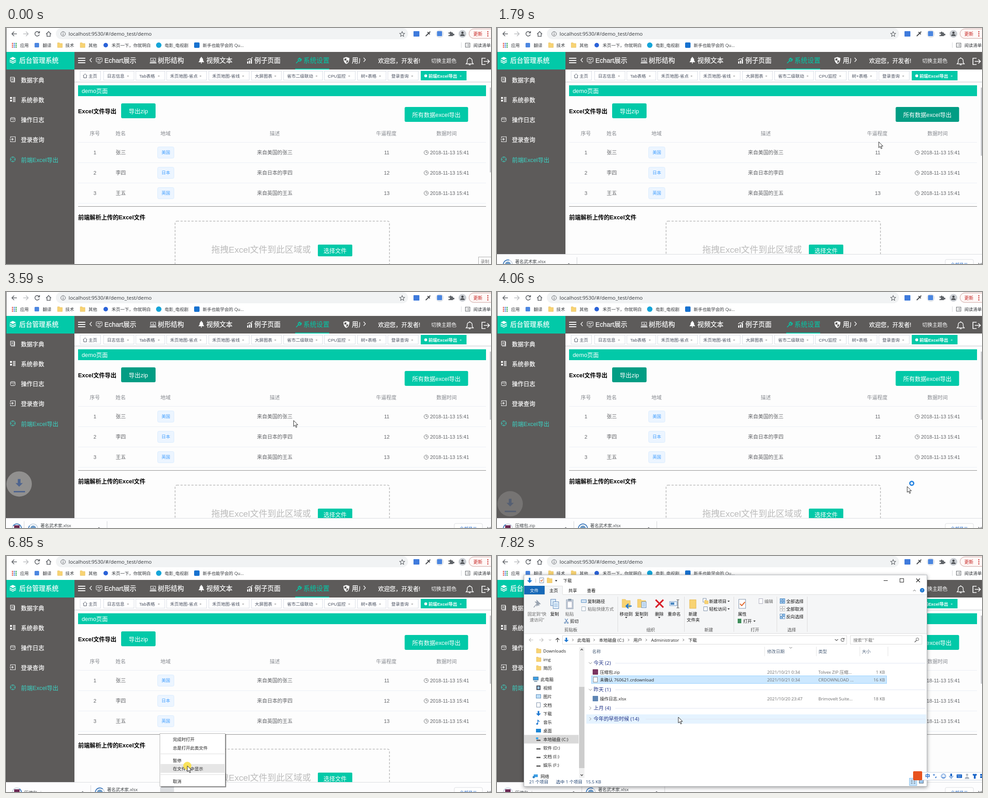
Recreate the animation shown at these times as an HTML page. Size 1070 by 523 pixels, loop 8000 ms.

```html
<!DOCTYPE html>
<html lang="zh-CN">
<head>
<meta charset="utf-8">
<title>demo</title>
<style>
html, body { margin: 0; width: 100%; height: 100%; overflow: hidden; background: #fff; }
svg { display: block; }
text { font-family: "Liberation Sans", "Noto Sans CJK SC", "Noto Sans CJK", sans-serif; white-space: pre; }
.ui text { font-family: "Open Sans", "Noto Sans CJK SC", "Noto Sans CJK", sans-serif; }
#win { filter: drop-shadow(0 2px 4px #0006); }
</style>
</head>
<body>
<svg id="stage" width="1070" height="523" viewBox="0 0 1070 523"></svg>
<script>
const TEAL = '#02c9a8', DARK = '#029d84', GREY = '#5d5b5a', BLUE = '#1f78d1', FOLDER = '#f8d373';

// Drawing helpers: each returns SVG markup; text is placed by its vertical centre.
const T = (x, y, s, str, fill = '#222', more = '') =>
  `<text x="${x}" y="${(y + s * .37).toFixed(2)}" font-size="${s}" fill="${fill}" ${more}>${str}</text>`;
const MID = 'text-anchor="middle"', END = 'text-anchor="end"', BOLD = 'font-weight="700"';
const FIRM = 'font-weight="500" stroke="#fff" stroke-width=".25"';
const R = (x, y, w, h, fill, more = '') => `<rect x="${x}" y="${y}" width="${w}" height="${h}" fill="${fill}" ${more}/>`;
const C = (x, y, r, fill, more = '') => `<circle cx="${x}" cy="${y}" r="${r}" fill="${fill}" ${more}/>`;
const P = (d, stroke = '#444', w = 1.2, fill = 'none', more = '') =>
  `<path d="${d}" stroke="${stroke}" stroke-width="${w}" fill="${fill}" ${more}/>`;
const G = (id, body, more = '') => `<g id="${id}" ${more}>${body}</g>`;
const each = (list, f) => list.map(f).join('');
const line = c => `stroke="${c}"`;
const folder = (x, y, k = 1) =>
  P(`M${x - 5 * k} ${y - 5 * k}h${4 * k}l${k} ${1.5 * k}h${5 * k}v${8.5 * k}h${-10 * k}z`, '#e3b64c', .6, FOLDER);
const page = (x, y, w, h, c = '#7a8ea8', fill = '#fff') => R(x - w / 2, y - h / 2, w, h, fill, line(c));
const down = (x, y, k, c) => P(`M${x - 2 * k} ${y - 6 * k}h${4 * k}v${6 * k}h${4 * k}l${-6 * k} ${6 * k}l${-6 * k} ${-6 * k}h${4 * k}z`, 'none', 0, c);

function browser() {
  const S = '#5f6368', u = 9.6;
  return R(0, 0, 1070, 53, '#fff')
    + P('M24 13H13M18 8l-5 5 5 5', S, 1.6) + P('M38 13h11M44 8l5 5-5 5', '#bbbdc0', 1.6)
    + P('M73 10a5 5 0 1 0 .6 4.5M74 7v4h-4', S, 1.6) + P('M88.5 13.5l5.5-5.5 5.5 5.5M90.5 12v6.5h7V12', S, 1.6)
    + R(110, 0, 777, 25, '#f1f3f4', 'rx="12.5"')
    + C(126, 13, 5, 'none', line(S)) + P('M126 12v4M126 9.5v1.3', S, 1.2)
    + T(138, 13, 11.4, 'localhost:9530/#/demo_test/demo', '#33363a')
    + P('M874 8l1.5 3.5 4 .4-3 2.6.9 4-3.4-2.1-3.4 2.1.9-4-3-2.6 4-.4z', S, 1.1)
    + R(899, 7, 13, 12, '#3f7bdc', 'rx="1"') + P('M926 18l6-6M930 9l5 5M933 11l3-3', '#4a4d51', 2.2)
    + C(957, 13, 9, '#e6e9ed') + R(951, 7, 11, 11, '#4b86e0', 'rx="1.5"')
    + P('M976 10h3a2 2 0 1 1 4 0h3v3a2 2 0 1 1 0 3v2h-10v-2.5a2 2 0 1 0 0-3z', S, 0, S)
    + C(1007, 13, 8.5, '#c9cdd2') + C(1007, 10.5, 2.5, '#4a4d51') + P('M1002 17.5a5 3.8 0 0 1 10 0z', S, 0, '#4a4d51')
    + R(1021.5, 2, 60, 21, '#fff8f7', 'rx="10.5" stroke="#c99a96"') + T(1031, 13, 10, '更新', '#c5221f')
    + each([8.5, 13, 17.5], y => C(1063, y, 1.3, '#c5221f'))
    + each([0, 1, 2, 3, 4, 5, 6, 7, 8], i => R(13 + i % 3 * 4, 33 + (i / 3 | 0) * 4, 2.6, 2.6, ['#e2574c', '#4b86e0', '#3aa757'][i % 3]))
    + R(63, 33, 10, 10, '#4b86e0', 'rx="1.5"') + folder(119, 38, 1.05) + folder(169, 38, 1.05)
    + C(220, 38, 5, '#2a62d8') + C(337, 38, 6, '#15a5d8') + R(415, 32, 12, 12, '#1772d0', 'rx="2"')
    + each([[31, '应用'], [81, '翻译'], [131, '技术'], [182, '其他'], [233, '禾页一下，你就明白'], [350, '电影_电视剧'],
      [434, '新手也能学会的 Qu...'], [1031, '阅读清单']], ([x, s]) => T(x, 38, u, s, '#33363a'))
    + P('M1004.5 32v12', '#d5d7da', 1) + R(1013.5, 33.5, 10, 9, 'none', line(S)) + P('M1015.5 36.5h1M1018 36.5h4M1015.5 39.5h1M1018 39.5h4', S, 1);
}

function side() {
  const items = ['数据字典', '系统参数', '操作日志', '登录查询', '前端Excel导出'], W = '#fff', A = '#3bd3c4';
  return R(0, 53, 151, 470, GREY) + R(0, 53, 151, 39, TEAL)
    + P('M15 64l7 3.5-7 3.5-7-3.5z', W, 0, W) + P('M8 71l7 3.5 7-3.5M8 74.5l7 3.5 7-3.5', W, 1.6)
    + T(29, 72, 14.5, '后台管理系统', W, FIRM)
    + each(items, (s, i) => T(33, 115 + i * 44.2, 12.8, s, i == 4 ? A : W, i == 4 ? '' : FIRM))
    + P('M10 109h8v9h-8zM12 112h4M12 114.5h4M19 110v10h-8', W, 1.2)
    + R(9, 153, 4, 4, W) + R(9, 159, 4, 4, W) + P('M15 154h6M15 157h6M15 160h6M15 163h6', W, 1.4)
    + R(10, 198.5, 10, 9, 'none', 'rx="2" ' + line(W)) + P('M10 201.5h10M15 205h2', W, 1)
    + P('M10 244v-3h10.5v11H10v-3M8 246.5h8M13.5 244l2.5 2.5-2.5 2.5', W, 1.1)
    + C(15, 291, 5.5, 'none', line(A)) + P('M15 285v4M15 293v4M9 291h4M17 291h4', A, 1);
}

function header() {
  const W = '#fff', tabs = [[216, 67, '日志信息'], [287, 64, 'Tab表格'], [355, 88, '禾页地图-省点'], [448, 89, '禾页地图-省线'],
    [542, 66, '大屏图表'], [613, 86, '省市二级联动'], [703, 68, 'CPU监控'], [776, 63, '树+表格'], [843, 67, '登录查询']];
  return R(151, 53, 919, 39, GREY)
    + P('M159 67h16M159 72h16M159 77h16', W, 2) + P('M189 66.5l-4 4.5 4 4.5', W, 1.3)
    + R(199, 66, 13, 9, 'none', 'rx="1" ' + line(W)) + P('M201.5 71l2.5-2 2 2.5 3.5-3M202 78h7', W, 1.2)
    + R(319, 67, 11, 10, 'none', line(W)) + P('M322 76v-5M325 76v-7M327.5 76v-4M317 77.5h15', W, 1.3)
    + P('M431 65l3 4v3l2 3h-10l2-3v-3zM431 75v4', W, 1.4, W)
    + R(532, 74, 2.5, 5, W) + R(536, 72, 2.5, 7, W) + R(540, 69, 2.5, 10, W) + P('M532 71l4-3 3 1 5-4', W, 1.3)
    + P('M640 78l6-6M645 72a3.5 3.5 0 0 1 4-5l-1 2.5 2 1 1.5-1.5a3.5 3.5 0 0 1-5 4z', TEAL, 1.7)
    + P('M751 65l6 2c0 6-2 10-6 12-4-2-6-6-6-12z', W, 1.2, W) + P('M751 67v5h-4.5v-4zM751 72h4.5q-1 4-4.5 6z', W, 0, GREY)
    + each([[217, 'Echart展示'], [335, '树形结构'], [442, '视频文本'], [548, '例子页面'], [656, '系统设置'], [763, '用户']],
      ([x, s], i) => T(x, 72, 14.4, s, i == 4 ? TEAL : W, i == 4 ? '' : FIRM))
    + R(638, 90, 75, 2, TEAL) + R(781, 60, 18, 28, GREY) + P('M789 66l4 4.5-4 4.5', W, 1.3)
    + T(821, 72, 12.8, '欢迎您，开发者!', W, FIRM) + T(938, 73, 11.2, '切换主题色', W)
    + P('M1015 79.5h16l-2.5-3v-4a5.5 5.5 0 0 0-11 0v4zM1021 81.5h4M1023 65v2', W, 1.4)
    + P('M1058 67h-8v14h8M1054 74h12M1062 69.5l4.5 4.5-4.5 4.5', W, 1.7)
    + R(151, 92, 919, 28, '#fff') + R(151, 118.5, 919, 2.5, '#e4e5e8')
    + R(163.5, 95.5, 45, 20, '#fff', line('#d8dce5')) + P('M170 106l4.5-4.5 4.5 4.5M171.5 105.5v5h6v-5', '#495060', 1) + T(182, 106, 9.6, '主页', '#495060')
    + each(tabs, ([x, w, s]) => R(x - .5, 95.5, w, 20, '#fff', line('#d8dce5')) + T(x + 7, 106, 9.6, s, '#495060') + T(x + w - 14, 106.5, 8, '×', '#777', MID))
    + R(915, 95, 101, 21, TEAL) + C(926, 106, 3.2, '#fff') + T(932, 106, 9.6, '前端Excel导出', '#fff', BOLD) + T(1003, 106.5, 8, '×', '#fff', MID);
}

function content() {
  const heads = [[196, '序号'], [253, '姓名'], [352, '地域'], [593, '描述'], [839, '牛逼程度'], [972, '数据时间']];
  const rows = [['张三', '美国'], ['李四', '日本'], ['王五', '英国']], ink = '#606266';
  return R(151, 120, 919, 403, '#fdfdfd') + R(159, 127, 900, 24, TEAL) + T(167, 139, 12.8, 'demo页面', '#fff')
    + T(159, 184, 12.8, 'Excel文件导出', '#000', BOLD)
    + R(254, 167, 76, 33, TEAL, 'rx="3" id="zipBtn"') + T(292, 184, 13, '导出zip', '#fff', MID)
    + R(879.5, 175, 140, 33, TEAL, 'rx="3" id="allBtn"') + T(949.5, 192, 12.8, '所有数据excel导出', '#fff', MID)
    + each(heads, ([x, s]) => T(x, 234, 11.2, s, '#85888e', MID + ' font-weight="500"'))
    + each([253, 298, 343, 388], y => R(159, y, 900, 1, '#ebeef5'))
    + each(rows, ([name, land], i) => {
      const y = 276 + i * 45;
      return T(196, y, 11.2, i + 1, ink, MID) + T(242, y, 11.2, name, ink)
        + R(334.5, y - 12.5, 36, 25, '#ecf5ff', 'rx="3" ' + line('#d9ecff')) + T(352.5, y - .5, 9.6, land, '#409eff', MID)
        + T(593, y, 11.2, `来自${land}的${name}`, ink, MID) + T(840, y, 11.2, 11 + i, ink, MID)
        + C(927, y, 4.6, 'none', line(ink) + ' stroke-width=".9"') + P(`M927 ${y - 3}v3h3`, ink, .9)
        + T(935.5, y, 11, '2018-11-13 15:41', ink);
    })
    + R(159, 395, 900, 1, '#8b8b8b') + T(159, 419, 12.8, '前端解析上传的Excel文件', '#000', BOLD)
    + R(373, 428, 473, 160, 'none', 'rx="4" stroke="#bbb" stroke-width="1.6" stroke-dasharray="4.8 3.2"')
    + T(453, 491, 19.2, '拖拽Excel文件到此区域或', '#bbb')
    + R(688, 480, 76, 26, TEAL, 'rx="2"') + T(726, 493, 12.8, '选择文件', '#fff', MID)
    + R(1067.5, 132, 2.5, 188, '#c4c6ca', 'id="bar"');
}

const item = (id, name, icon) => G(id,
  `<clipPath id="${id}Clip"><rect id="${id}Box" y="500" height="30"/></clipPath><g clip-path="url(#${id}Clip)">`
  + icon + C(20, 524, 10, 'none', 'stroke="#c3d0de" stroke-width="1.6"')
  + C(20, 524, 10, 'none', `stroke="#3b78bd" stroke-width="1.8" stroke-dasharray="38 25" id="${id}Ring"`)
  + `<g id="${id}Text">${T(36, 517, 9.6, name, '#3c4043')}</g></g>`
  + G(id + 'Edge', P('M0 508v20', '#d0d2d5', 1) + P('M-20.5 524l2.5-2 2.5 2', '#5f6368', 1.2)));

const shelf = () => G('shelf', R(0, 0, 1070, 60, '#fdfdfe', 'id="shelfBg"')
  + G('shelfLine', R(0, 0, 1070, 1, '#dadce0'))
  + item('zip', '压缩包.zip', R(14, 517, 12, 12, '#6d2a55')) + item('xls', '著名武术家.xlsx', C(20, 524, 6.5, '#6f9cc8'))
  + G('all', R(989, 0, 62, 24, '#fff', 'rx="3" ' + line('#dadce0')) + T(1020, 11.5, 9.6, '全部显示', '#1a63c8', MID)
    + P('M1062 8l7 7m0-7l-7 7', '#5f6368', 1.3)));

const badge = () => G('badge', C(29, 28, 28, '#c8c8c6') + P('M26 17h6v9h5l-8 8-8-8h5zM17 43.5h25v3h-25z', 'none', 0, '#3f6fc4'));

const menu = () => G('menu', R(340, 511, 30, 12, '#dcdee1') + R(342, 395, 143.5, 117.5, '#0008') + R(339.5, 393.5, 144, 117, '#fff', line('#b5b5b5'))
  + R(341, 461, 141, 19.5, '#e6e6e6', 'id="pick"') + R(341, 438, 141, 1, '#ddd') + R(341, 484, 141, 1, '#ddd')
  + each([[406, '完成时打开'], [425, '总是打开此类文件'], [453, '暂停'], [471, '在文件夹中显示'], [499, '取消']], ([y, s]) => T(368, y, 9.6, s)));

function explorer() {
  const s = 9.6, dim = '#6d6d6d', hair = '#dcdcdc', k = '#111';
  const frame = R(59.5, 42, 889, 468.5, '#fff', line('#b4b8bd'))
    + down(72, 54, .95, BLUE) + P('M85.5 50v9', '#bbb', 1) + page(98.5, 54, 9, 11) + P('M96 54l2 2 3-4', '#d9622b', 1.3) + folder(116, 54, 1.1)
    + P('M128 53.5h5l-2.5 3z', 'none', 0, k) + T(146, 54, s, '下载')
    + P('M853 54.5h9M925 50l8 8m0-8l-8 8', k, 1.1) + R(889, 50, 8, 8, 'none', line(k))
    + R(60, 66, 45, 19, '#1769b8') + T(82, 76, s, '文件', '#fff', MID)
    + R(60, 85, 888, 87, '#f5f6f7') + R(60, 85, 888, 1, hair) + R(105, 66, 40, 20, '#f5f6f7') + P('M105.5 85V66.5h39V85', hair, 1)
    + T(125, 76, s, '主页', k, MID) + T(167, 76, s, '共享', k, MID) + T(208, 76, s, '查看', k, MID)
    + P('M918 78l3-3 3 3', '#666', 1) + C(938, 76, 5, BLUE) + T(938, 76, 8, '?', '#fff', MID) + R(60, 171.5, 888, 1, hair);

  const big = [[88, '固定到“快', dim], [127, '复制'], [160, '粘贴', dim], [285, '移动到'], [319, '复制到'], [358, '删除'], [391, '重命名'], [432, '新建'], [541, '属性']];
  const small = [[161, 144, '剪切'], [200, 100, '复制路径'], [200, 117, '粘贴快捷方式', dim], [468, 100, '新建项目'], [468, 117, '轻松访问'],
    [543, 144, '打开'], [590, 100, '编辑', dim], [638, 100, '全部选择'], [638, 117, '全部取消'], [638, 134, '反向选择']];
  const carets = [[285, 135], [319, 135], [358, 135], [511, 99], [511, 116], [568, 143]];
  const ribbon = each([266, 413, 522, 617, 684], x => R(x, 90, 1, 78, hair))
    + each([[163, '剪贴板'], [339, '组织'], [467, '新建'], [569, '打开'], [650, '选择']], ([x, t]) => T(x, 163, s, t, '#555', MID))
    + each(big, ([x, t, c]) => T(x, 128, s, t, c || k, MID)) + T(88, 141, s, '速访问”', dim, MID) + T(433, 141, s, '文件夹', k, MID)
    + each(small, ([x, y, t, c]) => T(x, y, s, t, c || k))
    + each(carets, ([x, y]) => P(`M${x - 2.5} ${y}h5l-2.5 3z`, 'none', 0, '#333'))
    + P('M81 114l6-7M84 101l9 9M88 99l7 7-4 1-3 3z', '#9aa4b0', 1.8, '#9aa4b0')
    + page(124, 103, 11, 14, '#5a86ba', '#dcebf9') + page(130, 109, 12, 15, '#5a86ba', '#eef6fd') + P('M126 106h8M126 109h8M126 112h8', '#6aa0d8', 1)
    + R(153, 97, 15, 20, '#c9d3df', line('#8fa0b3')) + page(160.5, 108, 10, 14, '#aab') + R(157, 95, 7, 4, '#8797a8')
    + P('M150 139l5 8M156 139l-5 8', '#4a78b0', 1.2) + C(150, 148, 1.6, 'none', line('#4a78b0')) + C(156, 148, 1.6, 'none', line('#4a78b0'))
    + R(186, 97, 11, 6, '#dbe8f5', line('#4a86c0')) + page(191, 117, 8, 9, '#9ab')
    + folder(285, 105, 1.8) + P('M297 111h-11M290 106l-5 5 5 5', BLUE, 2.6)
    + folder(319, 105, 1.8) + page(324, 108, 10, 13, '#5a86ba', '#e4f0fb') + P('M321 105h6M321 108h6M321 111h6', '#6aa0d8', 1)
    + P('M350 97l17 17M367 97l-17 17', '#d8202a', 3.4) + R(381, 101, 16, 9, '#eaf3fc', line('#6a94c4')) + R(383, 103, 8, 5, '#4a86c0')
    + P('M399 97v18M396 97h6M396 115h6', '#555', 1.2)
    + R(425, 97, 14, 19, FOLDER, line('#e3b64c')) + page(458, 98, 7, 8) + folder(462, 102, .8) + page(460, 117, 8, 9)
    + page(541, 106, 15, 20) + P('M536 106l4 4 7-8', '#e0682f', 2.2) + R(531, 139, 8, 10, '#3e8e5a') + page(582, 100, 8, 11, '#aab')
    + each([0, 1, 2, 3, 4, 5, 6, 7, 8, 9, 10, 11], i => R(624.5 + i % 2 * 6, 94.5 + (i >> 1 & 1) * 6 + (i >> 2) * 17, 4.5, 4.5,
      i < 4 || i == 9 || i == 10 ? '#9dc8ef' : '#fff', line(i > 3 && i < 8 ? '#bbb' : '#4a86c0')));

  const tree = [[210, 'Downloads'], [229, 'img'], [248, '简历'], [292, '视频'], [311, '图片'], [330, '文档'], [349, '下载'], [368, '音乐'],
    [387, '桌面'], [406, '本地磁盘 (C:)'], [425, '软件 (D:)'], [444, '文档 (E:)'], [463, '娱乐 (F:)']];
  const nav = P('M80 186h-9M75 182l-4 4 4 4M93 186h9M98 182l4 4-4 4M114.5 185l2.5 2 2.5-2', '#bbb', 1.1)
    + P('M133.5 191v-9M129.5 186l4-4 4 4', '#444', 1.3)
    + R(144.5, 176.5, 627, 19, '#fff', line('#d9d9d9')) + down(153, 186, .85, BLUE)
    + each([167, 214, 290, 329, 411], x => P(`M${x - 1} 183.5l2.5 2.5-2.5 2.5`, '#555', 1))
    + each([[177, '此电脑'], [225, '本地磁盘 (C:)'], [301, '用户'], [340, 'Administrator'], [422, '下载']], ([x, t]) => T(x, 186, s, t))
    + P('M745.5 184.5l3.5 3 3.5-3M765 183.5a3.5 3.5 0 1 0 .8 3M766 181.5v3h-3', '#555', 1.2)
    + R(779.5, 176.5, 158, 19, '#fff', line('#d9d9d9')) + T(786, 186, s, '搜索"下载"', dim) + C(927.5, 184.5, 3, 'none', line('#555')) + P('M925.5 187l-4 4', '#555', 1.5)
    + R(60, 396.5, 120, 19, '#d9d9d9') + each(tree, ([y, t], i) => T(102, y, s, t)
      + (i < 3 ? folder(92, y) : i == 3 ? R(87, y - 5, 9, 10, '#4a4f5a') + R(89, y - 3, 5, 6, '#9dc8ef') : i == 4 ? R(86.5, y - 4, 10, 8, '#bfe0f8', line('#5a8ab8'))
      : i == 5 ? page(91.5, y, 8, 10) : i == 6 ? down(91.5, y, .9, BLUE) : i == 7 ? P(`M90 ${y + 4}v-9q1 3 4 4`, BLUE, 1.5) + C(88.5, y + 4, 2, BLUE)
      : i == 8 ? R(86, y - 4, 11, 8, '#1c86d6') : R(87, y + 1, 9, 3, '#666') + (i == 9 ? R(86, y - 4, 5, 4, '#38a3e8') : '')))
    + R(80, 268, 11, 7, '#3ea0e6', line('#47708e')) + P('M82 278h7', '#47708e', 1.4) + T(96, 273, s, '此电脑')
    + R(81, 484, 9, 6, '#3ea0e6') + C(81, 490, 2.5, '#2e82c4') + T(96, 488, s, '网络')
    + R(181, 202, 12, 290, '#f0f0f0') + R(181, 290, 12, 180, '#cdcdcd') + P('M184.5 209l2.5-3 2.5 3M184.5 484l2.5 3 2.5-3', '#444', 1.3)
    + T(71, 500, s, '21 个项目', '#1c3f70');

  const groups = [[237, '今天 (2)', 261], [296, '昨天 (1)', 261], [337, '上月 (4)', 261], [361, '今年的早些时候 (14)', 328]];
  const file = (y, name, date, type, size) => T(227, y, s, name) + T(596, y, s, date, dim) + T(709, y, s, type, dim) + T(856, y, s, size, dim, END);
  const list = each([[210, '名称'], [596, '修改日期'], [709, '类型'], [805, '大小']], ([x, t]) => T(x, 211, s, t, '#4c607a'))
    + each([590, 704, 800, 862], x => R(x, 201, 1, 21, '#e3e3e3')) + P('M645 202l3 2.5 3-2.5', '#777', 1)
    + R(197, 351, 750, 20.5, '#e5f3ff', 'id="hover"')
    + each(groups, ([y, t, x], i) => P(i < 2 ? `M202.5 ${y - 1.5}l3.5 3.5 3.5-3.5` : `M204 ${y - 3.5}l3.5 3.5-3.5 3.5`, '#8a8a8a', 1)
      + T(213, y, 11.2, t, '#1e3287') + R(x, y, 945 - x, 1, '#dfe5f1'))
    + R(211, 251, 12, 12, '#7a3560', 'rx="1"') + file(257, '压缩包.zip', '2021/10/21 0:34', 'Tolvex ZIP 压缩...', '1 KB')
    + G('sel', R(208.5, 265.5, 651, 17, '#cce8ff', line('#99d1ff')) + T(130, 500, s, '选中 1 个项目', '#1c3f70') + T(196, 500, s, '15.5 KB', '#1c3f70'))
    + page(217, 274, 9, 11, '#8a8a8a') + file(274, '未确认 760621.crdownload', '2021/10/21 0:34', 'CRDOWNLOAD ...', '16 KB')
    + R(211, 310, 12, 12, '#5f86b4', 'rx="1"') + file(316, '操作日志.xlsx', '2021/10/20 23:47', 'Brimovelt Suite...', '18 KB')
    + R(910, 492.5, 16, 16, '#cce8ff', line('#7ab8e8')) + P('M913 497h4M913 500.5h4M913 504h4M919 497h4M919 500.5h4M919 504h4', '#456', 1.2) + R(931.5, 496.5, 9, 7, '#9dc8ef', line('#567'));
  return G('win', frame + G('ribbon', ribbon) + G('nav', nav) + G('list', list));
}

const ime = () => G('ime', R(930, 479.5, 145, 17, '#fff', 'stroke="#c9d4e2"') + R(918, 477, 20, 20, '#e8531f', 'rx="2"')
  + T(950, 488, 11, '中', '#1b66c9', MID + ' ' + BOLD) + C(964, 485, 1.4, 'none', line('#1b66c9')) + P('M969 489l-1.5 3', '#1b66c9', 1.8)
  + C(985, 488, 5, 'none', line('#1b66c9')) + P('M982 489.5q3 3 6 0M983 485.5v1.5M987 485.5v1.5', '#1b66c9', 1.1)
  + R(1000, 482, 4, 7, '#1b66c9', 'rx="2"') + P('M998 487a4 4 0 0 0 8 0M1002 491v3', '#1b66c9', 1.1)
  + R(1014, 484, 12, 8, '#1b66c9', 'rx="1"') + P('M1016 486.5h8M1017 489.5h6', '#fff', 1, 'none', 'stroke-dasharray="1.5 1"')
  + C(1037, 485, 2.5, '#aab4c0') + P('M1032 494a5 5 0 0 1 10 0z', 'none', 0, '#aab4c0')
  + P('M1049 484l3-1.5q2 2 4 0l3 1.5-1.5 3-1.5-.5v7h-4v-7l-1.5.5z', 'none', 0, '#1b66c9')
  + each([0, 1, 2, 3], i => R(1066 + i % 2 * 5, 483 + (i >> 1) * 5, 4, 4, '#1b66c9')));

const pointer = () => G('cursor', C(0, 0, 9, '#f9e04a', 'id="press" opacity=".9"')
  + G('arrow', P('M0 0v13l3-2.7 2.2 5 2.1-.9-2.2-4.8h4.2z', '#222', 1, '#fff'))
  + G('hand', P('M-1.5 1.5q0-2 1.5-2t1.5 2v5l5 1.2q1.8.6 1.5 2.8l-1 5.5v3h-7.5v-2.5l-4.5-6q-.6-1.6 1-1.9l2.5 2z', '#222', 1, '#fff'))
  + G('busy', C(10, -7, 4.2, '#fff', 'stroke="#2583e0" stroke-width="3"')));

document.getElementById('stage').innerHTML = G('chrome', browser(), 'class="ui"') + content() + side() + header()
  + R(0, 0, 1, 523, '#4a4a4a')
  + `<g class="ui">${G('tip', R(1042.5, 507.5, 40, 20, '#fff', line('#aaa')) + T(1047, 517, 9.6, '录制', '#777'))}`
  + shelf() + badge() + explorer() + menu() + ime() + '</g>' + pointer();

const $ = id => document.getElementById(id);
const set = (id, name, v) => $(id).setAttribute(name, v);
const show = (id, on) => set(id, 'display', on ? 'inline' : 'none');
const move = (id, x, y) => set(id, 'transform', `translate(${x} ${y})`);
const prog = (t, start, dur) => Math.min(1, Math.max(0, (t - start) / dur));
const easeOut = p => 1 - (1 - p) ** 2;

// Pointer stops: time, x, y
const stops = [[0, 1056, 512], [70, 1056, 512], [830, 910, 186], [900, 910, 186], [1050, 951, 191], [1400, 951, 191], [2000, 800, 276],
  [2420, 264, 190], [2580, 258, 205], [2700, 302, 211], [2840, 304, 203], [2910, 304, 188], [3400, 304, 188], [3780, 960, 380],
  [4060, 905, 431], [4120, 908, 458], [4300, 950, 545], [5860, 355, 545], [6050, 355, 514], [6200, 355, 514], [6560, 400, 465],
  [7270, 400, 465], [7750, 400, 357], [8000, 400, 357]];
function pointerAt(t) {
  const i = stops.findIndex(s => s[0] > t), [t0, x0, y0] = stops[i - 1], [t1, x1, y1] = stops[i];
  const p = prog(t, t0, t1 - t0), e = p * p * (3 - 2 * p);
  return [x0 + (x1 - x0) * e, y0 + (y1 - y0) * e];
}

const between = (t, a, b) => t >= a && t < b;

function placeItem(id, x, w, t) {
  show(id, w > 0);
  move(id, x, 0);
  set(id + 'Box', 'width', w);
  move(id + 'Edge', w, 0);
  set(id + 'Ring', 'transform', `rotate(${t * .36 % 360} 20 524)`);
}

function draw(t) {
  const [x, y] = pointerAt(t);
  const onZip = between(x, 254, 330) && between(y, 167, 200), onAll = between(x, 880, 1019) && between(y, 175, 208);
  set('zipBtn', 'fill', onZip || between(t, 2910, 4120) ? DARK : TEAL);
  set('allBtn', 'fill', onAll || between(t, 830, 2070) ? DARK : TEAL);
  show('tip', t < 70);

  // download shelf and its items
  const open = t >= 1260, top = 549 - 48 * easeOut(prog(t, 1184, 133));
  show('shelf', open);
  move('shelfBg', 0, top);
  move('shelfLine', 0, top);
  move('all', 0, 513 + (top - 501) * .25);
  set('bar', 'height', open ? 151 + (top - 501) * .8 : 188);
  const wz = 183 * easeOut(prog(t, 3508, 800));
  placeItem('zip', 4, wz, t);
  placeItem('xls', 4 + wz, 183 * easeOut(prog(t, 1184, 800)), t + 400);
  move('zipText', 0, t < 4700 ? 0 : 7);
  show('zipRing', t < 7000);

  // falling download badge
  const second = t > 3000, p = prog(t, second ? 3500 : 1140, 600);
  show('badge', open && p > 0 && p < 1);
  move('badge', 0, (second ? 389 : 429) + 56 * p);
  set('badge', 'opacity', (1 - (p - .5) ** 2 * 4) * .95);

  show('menu', between(t, 6120, 6920));
  show('pick', t > 6480);

  // file window
  const w = easeOut(prog(t, 6920, 200)), k = .9 + .1 * w;
  show('win', t >= 6920);
  set('win', 'opacity', w);
  set('win', 'transform', `translate(504 276) scale(${k}) translate(-504 -276)`);
  show('ribbon', t >= 7270);
  show('nav', t >= 7340);
  show('list', t >= 7480);
  show('sel', t >= 7620);
  show('hover', between(y, 351, 372));
  show('ime', t >= 7060);

  show('cursor', t >= 70);
  move('cursor', x.toFixed(2), y.toFixed(2));
  show('hand', onZip || onAll);
  show('arrow', !onZip && !onAll);
  show('busy', between(t, 3900, 4300));
  show('press', between(t, 6780, 6900));
}

const begin = performance.now();
function tick() {
  draw((performance.now() - begin) % 8000);
  requestAnimationFrame(tick);
}
tick();
</script>
</body>
</html>
```
